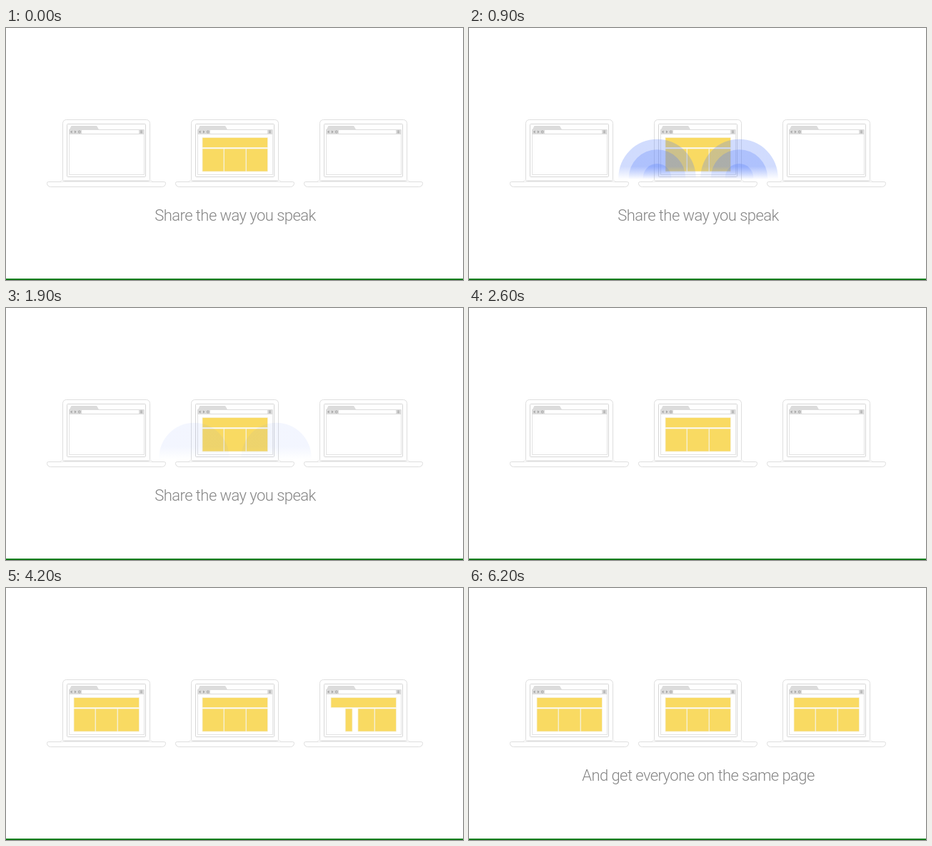
These frames come from a looping animation (640x353 px, 6400 ms). An HTML page with a canvas:

```html
<!DOCTYPE html>
<html lang="en">
<head>
<meta charset="utf-8">
<title>Share the way you speak</title>
<style>
  html, body { margin: 0; width: 100%; height: 100%; overflow: hidden; background: #fff; }
  canvas { display: block; }
</style>
</head>
<body>
<canvas id="stage" width="640" height="353"></canvas>
<script>
const ctx = document.getElementById('stage').getContext('2d');
const LOOP = 6400, STEP = 100;
const YELLOW = '#f9da62', LINE = '#dedede', GREY = '#dcdcdc', ICON = '#a2a2a2';
const RIPPLES = [
  { start: 50, tau: 280, end: 1670 },
  { start: -20, tau: 770, end: 1850 },
  { start: 625, tau: 640, end: 2100 },
];
const clamp = v => Math.max(0, Math.min(1, v));

function rect(x, y, w, h, color) {
  ctx.fillStyle = color;
  ctx.fillRect(x, y, w, h);
}

function outline(x, y, w, h, radius, color = LINE) {
  ctx.strokeStyle = color;
  ctx.lineWidth = 1;
  ctx.beginPath();
  ctx.roundRect(x, y, w, h, radius);
  ctx.stroke();
}

function path(color, ...points) {
  ctx.fillStyle = color;
  ctx.beginPath();
  points.forEach(([x, y]) => ctx.lineTo(x, y));
  ctx.fill();
}

function laptop() {
  outline(79.5, 128.5, 122, 86, [5, 5, 2, 2]);
  outline(85.5, 134.5, 110, 74, 1, '#d6d6d6');
  outline(88.5, 142.5, 105, 63, 0, '#e2e2e2');
  path(GREY, [89, 142], [91.5, 137], [127, 137], [130, 142]);
  rect(88, 142, 105, 7, GREY);
  rect(106, 143, 80, 5, '#fff');
  path(ICON, [90, 145.5], [92.5, 143.5], [92.5, 147.5]);
  path(ICON, [98.5, 145.5], [96, 143.5], [96, 147.5]);
  outline(101.5, 144, 2.5, 3, 1, ICON);
  for (const y of [143.5, 145, 146.5]) rect(188, y, 3, 0.8, ICON);
  outline(57.5, 215.5, 166, 7, [2, 2, 5, 5]);
  outline(76.5, 213.5, 128, 2, 1, '#ececec');
}

// Blocks open from their right edge: header first, then columns right to left.
function page(t, start, stagger) {
  const blocks = [[95.5, 154, 90.5, 13], [157, 169.5, 29, 31], [126, 169.5, 29.5, 31], [95.5, 169.5, 29, 31]];
  blocks.forEach(([x, y, w, h], i) => {
    const open = w * clamp((t - start - i * stagger) / 200);
    if (!open) return;
    rect(x + w - open - 0.7, y - 0.7, open + 1.4, h + 1.4, '#f4ecc4');
    rect(x + w - open, y, open, h, YELLOW);
  });
}

// Each ripple slows towards the full radius and fades out before its end.
function waves(t, cx) {
  for (const { start, tau, end } of RIPPLES) {
    if (t < STEP || t <= start || t >= end) continue;
    const radius = 57 * (1 - Math.exp((start - t) / tau));
    const alpha = 0.28 * clamp((end - t) / 800);
    const fill = ctx.createLinearGradient(0, 194, 0, 212);
    fill.addColorStop(0, `rgba(85,125,250,${alpha})`);
    fill.addColorStop(1, 'rgba(85,125,250,0)');
    ctx.fillStyle = fill;
    ctx.beginPath();
    ctx.arc(cx, 210, radius, 0, Math.PI * 2);
    ctx.fill();
  }
}

function caption(text, alpha) {
  if (!alpha) return;
  ctx.globalAlpha = alpha;
  ctx.fillStyle = '#858585';
  ctx.font = '300 22px Roboto, sans-serif';
  ctx.letterSpacing = '-0.56px';
  ctx.textAlign = 'center';
  ctx.fillText(text, 321, 270);
  ctx.globalAlpha = 1;
}

function draw(t) {
  rect(0, 0, 640, 353, '#fff');
  rect(0, 351, 640, 2, '#0f7d1c');
  const pages = [[3850, 50], [-1000, 0], [3870, 90]];
  pages.forEach(([start, stagger], i) => {
    ctx.save();
    ctx.translate(i * 180, 0);
    laptop();
    page(t, start, stagger);
    ctx.restore();
  });
  [263.5, 378.5].forEach(cx => waves(t, cx));
  caption('Share the way you speak', clamp((2600 - t) / 300));
  caption('And get everyone on the same page', clamp((t - 4500) / 400));
}

function tick() {
  const t = performance.now() % LOOP;
  draw(Math.floor(t / STEP) * STEP);
  requestAnimationFrame(tick);
}
tick();
</script>
</body>
</html>
```
